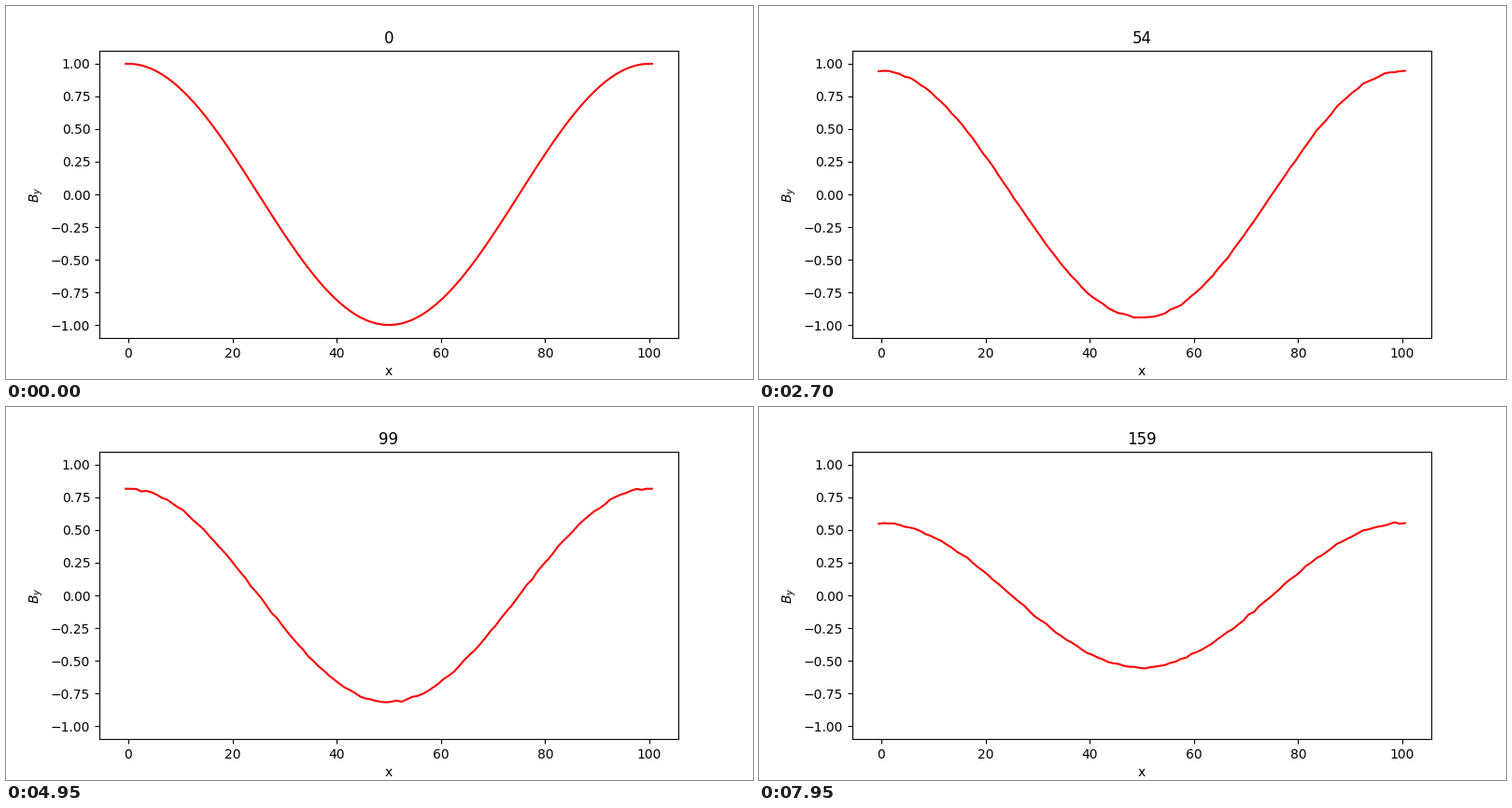
A matplotlib script that plays this animation: 800x400 px, repeating every 8 s.

```python
import numpy as np
import matplotlib.pyplot as plt
from matplotlib.animation import FuncAnimation

FRAMES = 160
INTERVAL = 50
CELLS = 100
OMEGA = 0.0062      # phase advance of the standing wave per step
NOISE = 0.0012

x = np.arange(CELLS + 2) - 0.5
k = 2 * np.pi / CELLS

# Weak periodic ripples that start from zero; short ones oscillate faster
rng = np.random.default_rng(7)
modes = np.arange(2, CELLS // 2)
amps = NOISE * rng.normal(size=modes.size)
phases = rng.uniform(0, 2 * np.pi, modes.size)
rates = OMEGA * modes
shapes = np.cos(k * np.outer(modes, x) + phases[:, None])


def field(step):
    wave = np.cos(OMEGA * step) * np.cos(k * x)
    return wave + (amps * np.sin(rates * step)) @ shapes


fig, ax = plt.subplots(figsize=(8, 4), dpi=100)
line, = ax.plot(x, field(0), color="red")
ax.set_xlabel("x")
ax.set_ylabel("$B_y$")
title = ax.set_title("0")


def update(step):
    line.set_ydata(field(step))
    title.set_text(str(step))
    return line, title


anim = FuncAnimation(fig, update, frames=FRAMES, interval=INTERVAL,
                     repeat=True, repeat_delay=0)
plt.show()
```
